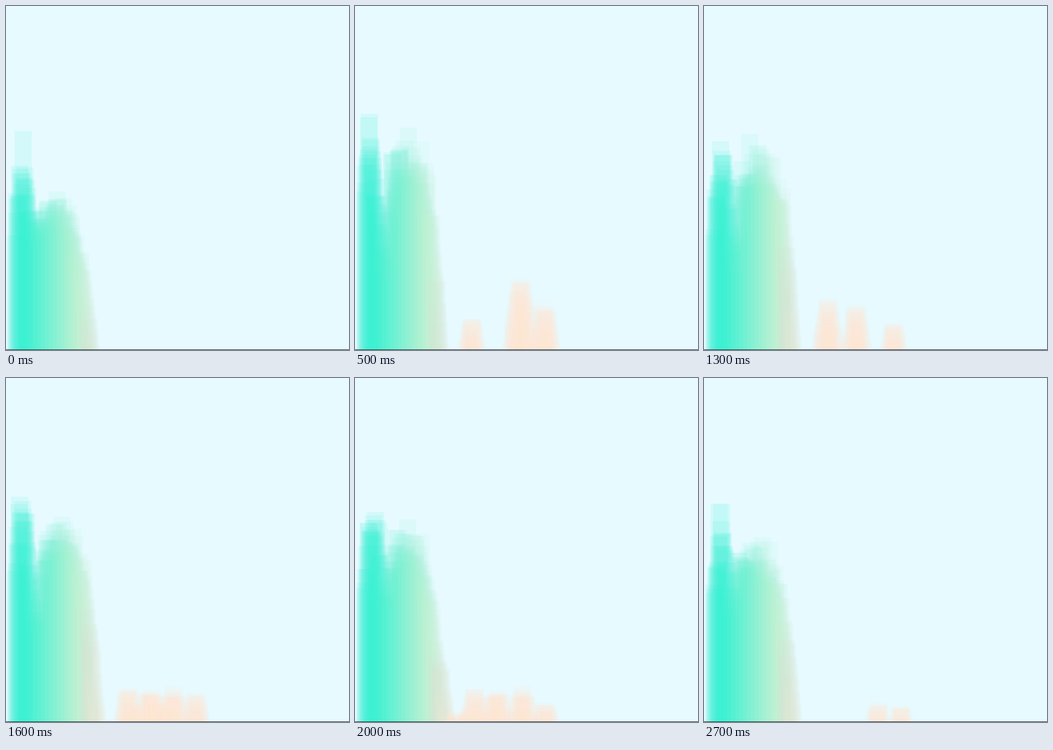
An HTML page with a canvas that plays this animation: 600x603 px, repeating every 2.8 s.

```html
<!DOCTYPE html>
<html lang="en">
<head>
<meta charset="utf-8">
<title>Spectrum</title>
<style>
  html, body { margin: 0; width: 100%; height: 100%; overflow: hidden; background: #e6faff; }
  canvas { display: block; }
</style>
</head>
<body>
<canvas id="stage" width="600" height="603"></canvas>
<script>
const ctx = document.getElementById('stage').getContext('2d');
const LOOP = 2800, STEP = 100, BASE = 602;
const PITCH = 600 / 512, BAR = 30, COUNT = 340, ALPHA = 0.1, ROUGH = 0.3;

// spike: [x, height], body: [x, height, right end], humps: [x, height]
const poses = [
  { at: 0, spike: [28, 440], body: [70, 290, 148], humps: [] },
  { at: 500, spike: [24, 495], body: [85, 410, 148], humps: [[202, 70], [288, 150], [330, 100]] },
  { at: 900, spike: [28, 510], body: [65, 410, 148], humps: [[196, 165], [240, 115], [315, 45]] },
  { at: 1300, spike: [30, 465], body: [88, 400, 155], humps: [[215, 105], [264, 95], [330, 60]] },
  { at: 1800, spike: [25, 550], body: [84, 400, 160], humps: [[210, 60], [248, 108], [291, 115], [331, 65]] },
  { at: 2300, spike: [40, 525], body: [72, 350, 138], humps: [[175, 45], [204, 100], [235, 60]] },
  { at: 2700, spike: [28, 460], body: [76, 350, 156], humps: [[302, 40], [342, 34]] }
];

const mix = (a, b, t) => a + (b - a) * t;
const center = i => i * PITCH + BAR / 2;

// Seeded noise in 0..1
function noise(n) {
  const v = Math.sin(n * 12.9898) * 43758.5453;
  return v - Math.floor(v);
}

const bump = (dx, height, width, power) =>
  height * Math.max(0, 1 - Math.abs(dx / width) ** power);

function envelope({ spike, body, humps }, x) {
  const [mid, tall, end] = body;
  return Math.max(
    bump(x - spike[0], spike[1], 36, 1),
    bump(x - mid, tall, x < mid ? 42 : end - mid, 3.5),
    ...humps.map(([at, h]) => bump(x - at, h, 4 + h / 10, 1.5))
  );
}

function barColor(i) {
  const t = Math.min(1, Math.max(0, (center(i) - 32) / 140));
  const rgb = [mix(42, 252, t), mix(229, 227, t), mix(205, 208, t)].map(Math.round);
  return `rgba(${rgb},${ALPHA})`;
}

const colors = Array.from({ length: COUNT }, (_, i) => barColor(i));
const heights = poses.map((pose, k) => colors.map((_, i) =>
  envelope(pose, center(i)) * (1 - ROUGH * Math.sqrt(noise(i + k * COUNT + 1)))));

function draw(time) {
  const k = poses.findLastIndex(p => p.at <= time);
  const next = (k + 1) % poses.length;
  const end = next ? poses[next].at : LOOP;
  const t = (time - poses[k].at) / (end - poses[k].at);

  ctx.fillStyle = '#e6faff';
  ctx.fillRect(0, 0, 600, 603);
  colors.forEach((color, i) => {
    const h = Math.round(mix(heights[k][i], heights[next][i], t));
    ctx.fillStyle = color;
    ctx.fillRect(2 + i * PITCH, BASE - h, BAR, h);
  });
  ctx.fillStyle = '#30383a';
  ctx.fillRect(0, BASE, 600, 1);
}

const start = performance.now();
function tick() {
  const time = (performance.now() - start) % LOOP;
  draw(Math.floor(time / STEP) * STEP);
  requestAnimationFrame(tick);
}
tick();
</script>
</body>
</html>
```
